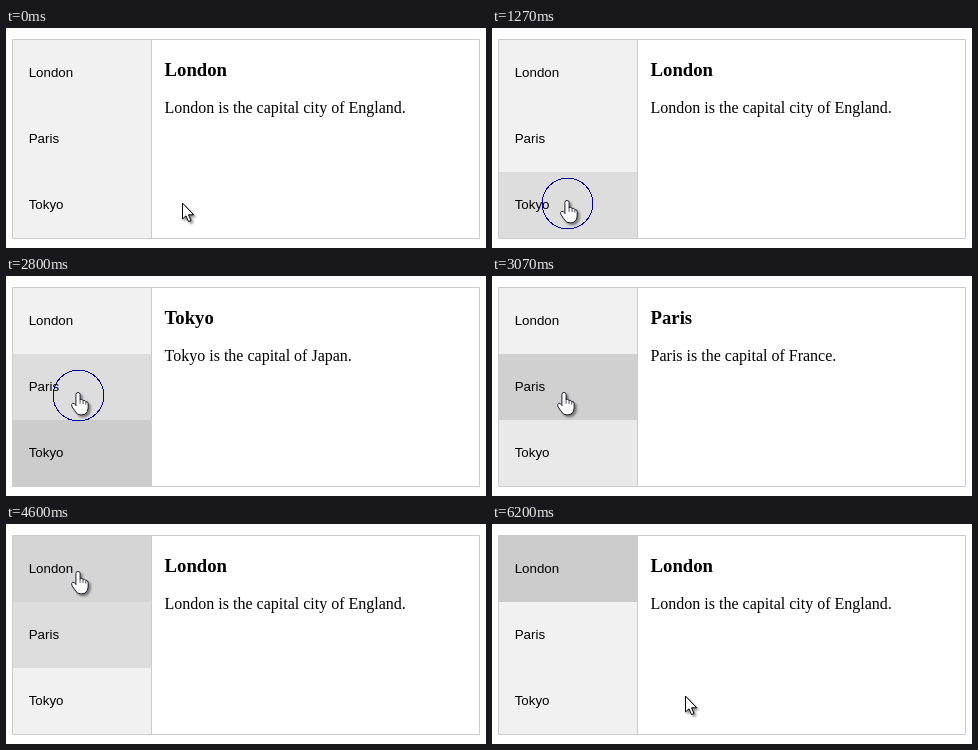
Recreate the animation shown at these times as an HTML page. Size 480 px wide and 220 px high, loop 6270 ms.

```html
<!DOCTYPE html>
<html lang="en">
<head>
<meta charset="utf-8">
<title>Vertical tabs</title>
<style>
html, body { margin: 0; width: 100%; height: 100%; overflow: hidden; background: #fff; }
svg { display: block; }
.tab { font: 13.333px "Liberation Sans", Arial, sans-serif; }
.head { font: bold 18.72px "Liberation Serif", "Times New Roman", serif; }
.body { font: 16px "Liberation Serif", "Times New Roman", serif; }
#cursor { filter: drop-shadow(2px 2px 1.2px rgba(0, 0, 0, .45)); }
</style>
</head>
<body>
<svg width="480" height="220" viewBox="0 0 480 220">
  <g id="tabs"></g>
  <path d="M6.5 11.5H473.5V210.5H6.5ZM145.5 12V210" fill="none" stroke="#ccc"/>
  <text id="head" class="head" x="158.6" y="48"></text>
  <text id="body" class="body" x="158.6" y="85"></text>
  <circle id="ring" fill="none" stroke="#00009c" shape-rendering="crispEdges"/>
  <g id="cursor" fill="#fff" stroke="#000" stroke-linejoin="round" stroke-linecap="round">
    <path id="arrow" d="M.5 .5V16L4 12.8 6.5 18.6 9 17.5 6.5 11.8H11.3Z"/>
    <g id="hand" stroke="#161626" transform="scale(.94)">
      <path d="M-2.2 14V2.5Q-2.2 .5 0 .5T2.2 2.5V8Q4.4 7 5.5 9Q7.6 8.2 8.4 10.2Q10.8 9.8 10.8 12.5V17Q10.8 21 7.5 23.5Q3.5 25.2 -.5 23.5Q-3.5 20 -6.3 15.8Q-7.6 13 -5.8 12Q-4.2 11.6 -2.2 14Z"/>
      <path d="M2.2 8V12M5.4 9V12.4M8.3 10.4V13" fill="none" stroke-width=".8"/>
    </g>
  </g>
</svg>
<script>
const LOOP = 6270, FADE = 300, RING_STEP = 130;
const IDLE = 0xf1, HOVER = 0xdd, ACTIVE = 0xcc;
const $ = id => document.getElementById(id);

const tabs = [
  { name: "London", line: "London is the capital city of England.", enter: 3700, click: 4530 },
  { name: "Paris", line: "Paris is the capital of France.", enter: 1900, click: 2930 },
  { name: "Tokyo", line: "Tokyo is the capital of Japan.", enter: 300, click: 1400 }
];

const home = { x: 176, y: 175 };
const moves = [
  { from: 200, to: 800, x: 75, y: 172 },
  { from: 1600, to: 2870, x: 72, y: 116 },
  { from: 3600, to: 4000, x: 72, y: 47 },
  { from: 4870, to: 5200, x: 73, y: 43.5 },
  { from: 5600, to: 6200, x: 193, y: 172 }
];

$("tabs").innerHTML = tabs.map((tab, i) =>
  `<rect x="7" y="${12 + 66 * i}" width="138" height="66"/>
   <text class="tab" x="22.7" y="${49 + 66 * i}">${tab.name}</text>`).join("");
const rects = document.querySelectorAll("rect");

const ease = k => 1 - Math.pow(1 - Math.min(1, Math.max(0, k)), 2.35);
const mix = (a, b, k) => a + (b - a) * k;

// Hovered, then opened, then released when the tab above is clicked
function shadeAt(i, t) {
  const fade = start => ease((t - start) / FADE);
  let level = mix(IDLE, HOVER, fade(tabs[i].enter));
  level = mix(level, ACTIVE, fade(tabs[i].click));
  if (i > 0) level = mix(level, IDLE, fade(tabs[i - 1].click));
  return Math.round(level);
}

function pointerAt(t) {
  return moves.reduce((p, m) => {
    const k = ease((t - m.from) / (m.to - m.from));
    return { x: mix(p.x, m.x, k), y: mix(p.y, m.y, k) };
  }, home);
}

// The click ring grows in two equal steps just before a tab opens
function ringAt(t) {
  const step = click => Math.floor((t - click) / RING_STEP) + 3;
  const n = tabs.map(tab => step(tab.click)).find(s => s === 1 || s === 2) || 0;
  return 12.7 * n;
}

function set(id, attrs) {
  for (const key in attrs) $(id).setAttribute(key, attrs[key]);
}

function draw(t) {
  rects.forEach((rect, i) => {
    const v = shadeAt(i, t);
    rect.setAttribute("fill", `rgb(${v},${v},${v})`);
  });

  const open = tabs.find(tab => t >= tab.click) || tabs[0];
  $("head").textContent = open.name;
  $("body").textContent = open.line;

  const { x, y } = pointerAt(t);
  const overTab = x < 145;
  set("cursor", { transform: `translate(${x} ${y})` });
  set("hand", { visibility: overTab ? "visible" : "hidden" });
  set("arrow", { visibility: overTab ? "hidden" : "visible" });
  set("ring", { cx: x + 0.5, cy: y + 3.5, r: ringAt(t) });
}

const begin = performance.now();
function tick() {
  draw((performance.now() - begin) % LOOP);
  requestAnimationFrame(tick);
}
tick();
</script>
</body>
</html>
```
